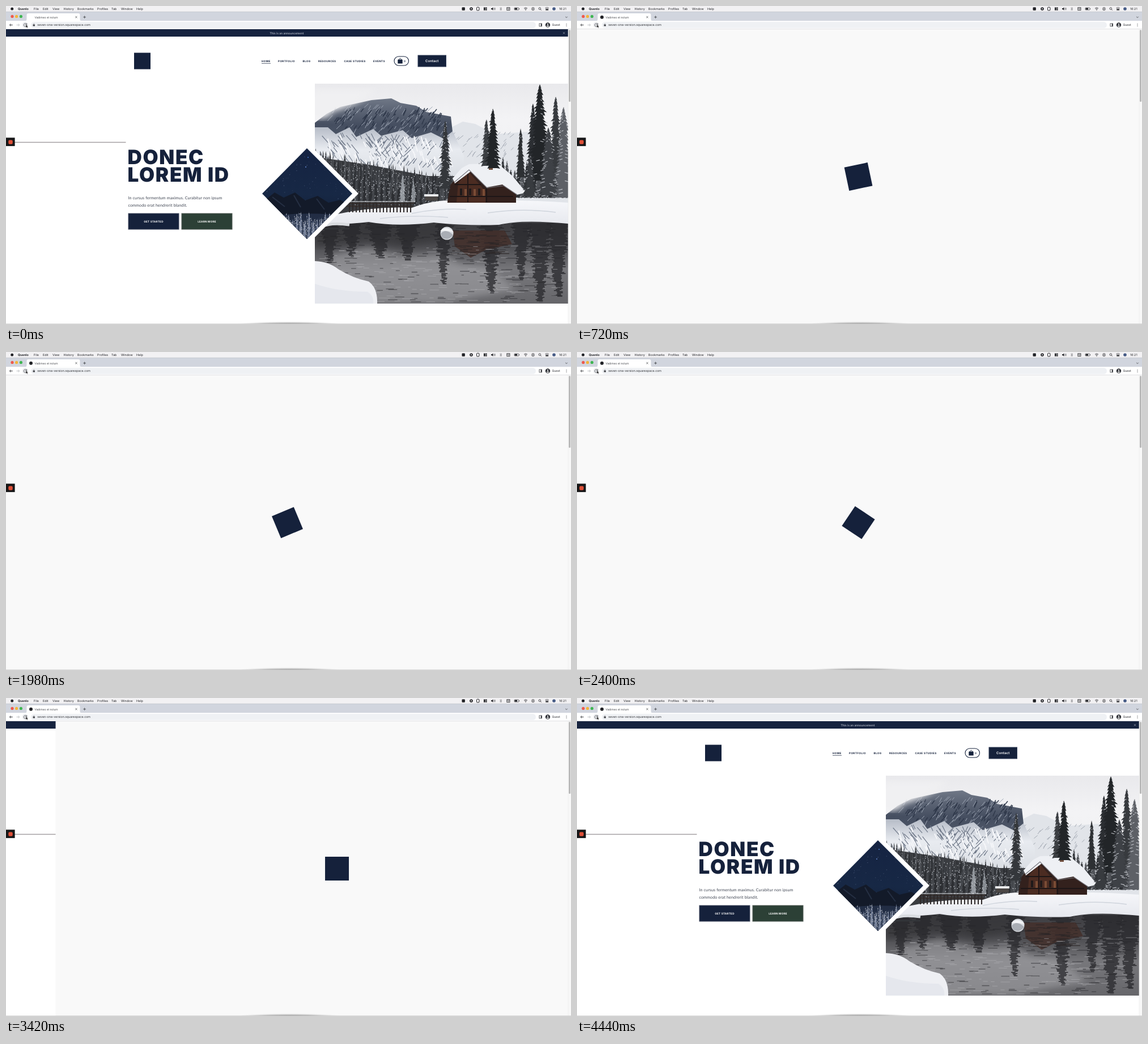
Write an HTML page that moves like this. It is 997 px wide and 561 px high and loops after 4.47 s.

```html
<!DOCTYPE html>
<html lang="en">
<head>
<meta charset="utf-8">
<title>Page loader</title>
<style>
html, body { margin: 0; width: 100%; height: 100%; overflow: hidden; background: #fff; }
svg { display: block; width: 997px; height: 561px; text-rendering: geometricPrecision; }
text { font-family: Inter, "Open Sans", sans-serif; white-space: pre; }
.soft { font-family: Lato, Inter, sans-serif; }
</style>
</head>
<body>
<svg id="stage" viewBox="0 0 997 561" xmlns="http://www.w3.org/2000/svg"></svg>
<script>
const LOOP = 4470, NAVY = '#15213b';

let seed = 11;
const rnd = (a = 0, b = 1) => {
  seed = (seed * 16807) % 2147483647;
  return a + (b - a) * seed / 2147483647;
};
const repeat = (n, fn) => Array.from({ length: n }, (_, i) => fn(i)).join('');
const n1 = v => v.toFixed(1);

const rect = (x, y, w, h, fill, more = '') =>
  `<rect x="${x}" y="${y}" width="${w}" height="${h}" fill="${fill}" ${more}/>`;
const dot = (x, y, r, fill, more = '') => `<circle cx="${x}" cy="${y}" r="${r}" fill="${fill}" ${more}/>`;
const shape = (d, fill, more = '') => `<path d="${d}" fill="${fill}" ${more}/>`;
const line = (d, color, w = 1, more = '') =>
  `<path d="${d}" fill="none" stroke="${color}" stroke-width="${w}" ${more}/>`;
const text = (x, y, size, str, fill, more = '') =>
  `<text x="${x}" y="${y}" font-size="${size}" fill="${fill}" ${more}>${str}</text>`;
const grad = (id, ...stops) => `<linearGradient id="${id}" x1="0" y1="0" x2="0" y2="1">` +
  stops.map(([at, c]) => `<stop offset="${at}" stop-color="${c}"/>`).join('') + '</linearGradient>';

const defs = `<defs>
  ${grad('sky', [0, '#e9e9ec'], [.25, '#f3f3f5'], [1, '#eceef1'])}
  ${grad('rock', [0, '#6f7786'], [.3, '#454e60'], [1, '#6c7482'])}
  ${grad('snow', [0, '#b6bcc7'], [.35, '#e8ebf0'], [1, '#d4d8de'])}
  ${grad('lake', [0, '#3c3c40'], [.3, '#4a4a4e'], [.6, '#77777b'], [1, '#66666a'])}
  ${grad('night', [0, '#152342'], [.5, '#172845'], [1, '#0f1a2f'])}
  ${grad('bank', [0, '#f6f7fa'], [1, '#e6e8ee'])}
  <radialGradient id="dock"><stop offset="0" stop-color="#a5a5a5"/><stop offset=".5" stop-color="#c4c4c4"/>
    <stop offset="1" stop-color="#ddd" stop-opacity="0"/></radialGradient>
  <filter id="blur"><feGaussianBlur stdDeviation="6"/></filter>
  <clipPath id="photo"><rect x="545" y="137" width="447" height="388"/></clipPath>
  <clipPath id="gem"><path d="M531 251L611 331L531 411L452 331Z"/></clipPath>
</defs>`;

// Fir with ragged branches and flecks of snow.
function fir(x, top, base, w, fill, snow = .4) {
  const steps = Math.max(5, Math.round((base - top) / 6)), left = [], right = [];
  let flecks = '';
  for (let i = 1; i <= steps; i++) {
    const y = top + (base - top) * i / steps, half = w * Math.pow(i / steps, .6);
    const l = half * rnd(.6, 1.1), r = half * rnd(.6, 1.1);
    left.unshift(`L${n1(x - l * .55)} ${n1(y)}L${n1(x - l)} ${n1(y + 1)}`);
    right.push(`L${n1(x + r)} ${n1(y + 1)}L${n1(x + r * .55)} ${n1(y)}`);
    for (let k = 0; k < 2; k++) {
      const side = rnd(-.7, .7) * half;
      if (rnd() < snow) flecks += `M${n1(x + side)} ${n1(y - k * 3)}l${n1(Math.sign(side) * half * .3)} 1.6`;
    }
  }
  return shape(`M${x} ${top}${right.join('')}${left.join('')}Z`, fill) + line(flecks, '#c3c6cc', 1.1);
}

function mountains() {
  const streaks = (n, x0, x1, y0, y1, slant, len) => repeat(n, () => {
    const k = rnd(.4, 1);
    return `M${n1(rnd(x0, x1))} ${n1(rnd(y0, y1))}l${n1(k * slant * rnd(.5, 1.3))} ${n1(k * len)}`;
  });
  return rect(545, 137, 447, 250, 'url(#sky)') +
    shape('M770 222L806 204L828 208L862 226L920 222L992 255V350H770Z', '#e1e4e9') +
    line(streaks(45, 790, 905, 222, 262, -8, 8), '#a3a9b3', 1) +
    shape('M545 206L566 190L590 178L622 171L645 166L680 163L696 171L724 176L742 187L785 195L788 222L806 262V320H545Z', 'url(#rock)') +
    line(streaks(90, 585, 770, 178, 214, -8, 11), '#2f384a', 1.5) +
    line(streaks(75, 575, 778, 172, 222, -9, 10), '#9da5b3', 1) +
    shape('M545 214L568 214L582 226L606 214L618 231L648 217L662 229L700 219L716 233L750 223L772 234L788 221L808 264V325H545Z', 'url(#snow)') +
    line(streaks(55, 552, 700, 222, 270, 14, 17), '#717a8a', 1.2) +
    line(streaks(60, 640, 792, 225, 280, -14, 17), '#717a8a', 1.2) +
    line(streaks(70, 560, 790, 228, 280, 9, 20), '#f5f6f9', 2) +
    `<g filter="url(#blur)">${dot(556, 174, 24, '#f0f0f2')}${shape('M545 148H655L618 171L585 184H545Z', '#f0f0f2')}</g>`;
}

function forest() {
  const far = repeat(120, i => {
    const x = 545 + i * 2.5 + rnd(-2, 2), top = 258 + (x - 545) * .19 + rnd(-8, 10);
    return fir(+n1(x), top, top + 50, rnd(3, 5), ['#3a3d42', '#4e5156', '#2c2e32'][i % 3], .35);
  });
  const right = repeat(24, i => fir(835 + i * 7, rnd(262, 290), 338, 8, i % 2 ? '#505358' : '#303337', .6));
  return shape('M545 266L640 280L745 300L800 300V368H545Z', '#3a3c40') + far +
    repeat(45, i => fir(548 + i * 5, rnd(300, 315), 350, 5, i % 2 ? '#2d2f33' : '#45484d', .4)) + right +
    fir(700, 297, 344, 7, '#94999f', .9) + fir(719, 306, 344, 6, '#858a90', .9);
}

function cabin() {
  return shape('M779 345L784 316L803 291L828 285L900 326V347H779Z', '#33211d') +
    shape('M795 346L798 312L816 292L846 327V347Z', '#4b2c22') +
    repeat(6, i => rect(801 + i * 8, 322 + i % 2, 4, 12, i % 2 ? '#7a4c35' : '#1f1a1a')) +
    line('M783 336H895M792 315H838M815 292V346M848 315V346', '#1d1617', 1.8) +
    shape('M788 304L804 286L817 279L868 278L893 299L918 329L902 333L876 315L848 320L820 292L792 313Z', '#eef0f4') +
    line('M791 311L817 289L849 321M848 321L878 317L902 333', '#77777e', 1.2) +
    rect(852, 280, 7, 9, '#72503f');
}

function lake() {
  const ripple = (n, x0, x1, y0, y1) => repeat(n, () =>
    `M${n1(rnd(x0, x1))} ${n1(rnd(y0, y1))}h${n1(rnd(4, 20))}`);
  // A reflection is a stack of short strokes that thins out downwards.
  const column = (x, w, h) => line(repeat(Math.round(h / 2), i => {
    const half = w * (1 - i * 1.6 / h) * rnd(.6, 1.1);
    return `M${n1(x - half + rnd(-3, 3))} ${384 + i * 2}h${n1(half * 2)}`;
  }), '#29292c', 2, 'opacity=".75"');
  return rect(545, 376, 447, 149, 'url(#lake)') +
    shape('M570 440L640 425L700 442L770 436L800 455L850 460L900 500L760 525H600Z', '#a5a5a9', 'opacity=".55" filter="url(#blur)"') +
    shape('M545 380H780L790 410L700 424L640 412L545 425Z', '#343438', 'opacity=".7" filter="url(#blur)"') +
    column(572, 20, 70) + column(610, 20, 60) + column(660, 26, 62) + column(708, 24, 66) +
    column(772, 17, 108) + column(856, 22, 124) + column(910, 18, 100) + column(943, 24, 139) + column(975, 22, 130) +
    shape('M788 396L880 396L893 420L847 430L820 444L792 424Z', '#43302b', 'opacity=".85"') +
    line(ripple(60, 785, 880, 396, 438), '#2b2526', 1.4, 'opacity=".7"') +
    line(ripple(170, 548, 980, 420, 523), '#b7b7bb', 1, 'opacity=".5"') +
    line(ripple(190, 548, 980, 388, 523), '#232326', 1.3, 'opacity=".5"');
}

function shore() {
  const posts = repeat(19, i => `M${606 + i * 6} 347v17`);
  return shape('M580 368Q650 353 716 356Q762 338 812 345Q898 340 992 347V384Q910 376 870 386Q810 388 755 382Q690 390 640 381Q600 386 545 384V368Z', 'url(#bank)') +
    line('M600 348H720M600 353H718', '#37302e', 2.4) + line(posts, '#2e2929', 2) +
    line('M605 345H722', '#e6e8ec', 1.2) +
    line('M716 366Q765 356 812 359M850 365Q910 356 970 364M660 375Q720 368 780 373', '#cfd4dc', 1.4) +
    rect(740, 334, 22, 9, '#4a4644') + rect(738, 332, 25, 4, '#eceef1') +
    line('M555 390Q573 381 606 386', '#d9dce0', 5) + line('M553 393H606', '#33363a', 2) +
    dot(778, 401, 11.5, '#d9dce1') + shape('M767 402Q776 391 789 404Q781 415 770 409Z', '#a9adb4') +
    shape('M766 397Q778 386 790 399Q779 396 766 397Z', '#f3f4f6') +
    shape('M545 450Q570 451 586 464Q612 480 640 486Q656 497 655 525H545Z', '#eeeff3') +
    shape('M545 490Q585 504 638 504Q650 512 648 525H545Z', '#e0e3e9', 'opacity=".6"');
}

function bigFirs() {
  const dark = '#222528';
  return fir(775, 202, 322, 15, '#34373b', .7) + fir(848, 200, 282, 12, '#3b3e42', .5) +
    fir(859, 181, 286, 16, dark, .35) + fir(908, 216, 302, 10, '#2d3033', .3) +
    fir(930, 172, 302, 16, '#2b2e32', .35) + fir(970, 160, 300, 17, '#373a3e', .45) +
    fir(942, 138, 308, 25, dark, .35) + fir(984, 178, 338, 24, '#5d6066', .9) +
    fir(957, 214, 334, 22, '#3e4146', .7) + fir(925, 262, 336, 14, '#383b3f', .6);
}

function nightGem() {
  const stars = repeat(110, () => dot(n1(rnd(455, 608)), n1(rnd(255, 360)), n1(rnd(.2, .6)), '#7f8fb0', 'opacity=".6"'));
  const firs = repeat(45, i => fir(452 + i * 3.6, rnd(362, 378), 411, 4, i % 2 ? '#76829b' : '#38445c', .8));
  return shape('M531 240L622 331L531 422L440 331Z', '#fff') +
    `<g clip-path="url(#gem)">${rect(450, 250, 164, 164, 'url(#night)')}${stars}
    ${dot(533, 267, 1, '#4778cc')}${dot(529, 284, .9, '#6c94df')}
    ${shape('M450 348L474 329L490 338L510 329L528 343L550 335L569 347L590 342L614 356V412H450Z', '#131a29')}
    ${line('M470 337L492 354M508 334L520 355M548 340L562 359', '#252f43', 2)}
    ${shape('M450 373Q530 360 612 372V412H450Z', '#222d44')}${firs}</g>`;
}

function button(x, y, w, h, fill, edge, label, base, size, more) {
  return rect(x, y, w, h, fill, `stroke="${edge}"`) +
    text(x + w / 2, base, size, label, '#fff', `text-anchor="middle" ${more}`);
}

function page() {
  const bold = 'font-weight="700" letter-spacing=".4"';
  const nav = [[451, 'HOME'], [480, 'PORTFOLIO'], [523.5, 'BLOG'], [551, 'RESOURCES'], [596.5, 'CASE STUDIES'], [648, 'EVENTS']];
  const title = 'font-weight="900" letter-spacing="1.7"';
  return rect(0, 41, 992, 520, '#fff') + rect(0, 41, 992, 13, '#16233f') +
    text(495.5, 49.6, 5.3, 'This is an announcement', '#d8dce5', 'class="soft" text-anchor="middle" letter-spacing=".1"') +
    line('M983 46.2l3 3m0-3l-3 3', '#c4c9d3', .6) +
    rect(226, 82.5, 29, 29, NAVY) +
    nav.map(([x, s]) => text(x, 98.6, 4.6, s, NAVY, bold)).join('') +
    line('M451 101.3H467', NAVY, .7) +
    rect(685, 89, 25.5, 16, '#fff', `rx="8" stroke="${NAVY}" stroke-width="1.1"`) +
    rect(691.3, 94.5, 8.4, 7, NAVY, 'rx=".6"') + line('M693.5 96V93.8Q695.5 90.8 697.5 93.8V96', NAVY, 1) +
    text(702, 99, 4.6, '0', NAVY, 'font-weight="600"') +
    button(727, 87, 49.5, 20, NAVY, '#34405a', 'Contact', 99.2, 6, 'font-weight="600" letter-spacing=".1"') +
    line('M0 240.5H211.5', '#a5a0a2', 1.3) +
    text(214.5, 279, 35, 'DONEC', NAVY, title) + text(214.5, 310, 35, 'LOREM ID', NAVY, title) +
    text(215.5, 341.2, 7.1, 'In cursus fermentum maximus. Curabitur non ipsum', '#3d4350', 'class="soft" letter-spacing=".12"') +
    text(215.5, 354.3, 7.1, 'commodo erat hendrerit blandit.', '#3d4350', 'class="soft" letter-spacing=".12"') +
    button(216, 366, 89, 28, NAVY, '#485064', 'GET STARTED', 381.7, 4.7, 'font-weight="700" letter-spacing=".2"') +
    button(310, 366, 89, 28, '#2c4036', '#515a55', 'LEARN MORE', 381.7, 4.7, 'font-weight="700" letter-spacing=".2"') +
    `<g clip-path="url(#photo)">${mountains()}${forest()}${lake()}${shore()}${cabin()}${bigFirs()}</g>` + nightGem();
}

function browser() {
  const ink = '#222327';
  const menu = [[49, 'File'], [65, 'Edit'], [82, 'View'], [101.5, 'History'], [126, 'Bookmarks'],
    [161, 'Profiles'], [186, 'Tab'], [203, 'Window'], [230, 'Help']];
  const bar = rect(0, 0, 997, 10, '#f2f1f3') + dot(10.7, 5, 2.5, ink) +
    text(21, 7, 5.4, 'Quenlo', ink, 'font-weight="700"') +
    menu.map(([x, s]) => text(x, 7, 5.4, s, ink)).join('') +
    rect(804.5, 2.3, 5.4, 5.4, ink, 'rx="1.2"') + dot(821, 5, 2.8, ink) + dot(821, 5, 1.1, '#f2f1f3') +
    rect(830.5, 2.2, 4.5, 5.6, 'none', `rx="1" stroke="${ink}"`) +
    rect(843, 2.4, 2.6, 5.2, ink) + rect(846.2, 2.4, 2.4, 2.3, ink) + rect(846.2, 5.3, 2.4, 2.3, ink) +
    shape('M856 4h1.5l2-1.7v5.4l-2-1.7H856Z', ink) + line('M861 3.5q1 1.5 0 3M862.5 2.7q1.6 2.3 0 4.6', ink, .6) +
    line('M871 3l4 4M873 2.3v5.4l2-1.7M873 2.3l2 1.7-4 3', '#77787c', .6) +
    rect(883.8, 2.7, 5.2, 4.8, 'none', `stroke="${ink}" stroke-width=".8"`) + line('M884 4.2h5M885 5.8h3', ink, .6) +
    rect(897, 3, 8, 4, 'none', `rx="1" stroke="${ink}" stroke-width=".6"`) + rect(897.6, 3.5, 4.5, 3, ink) + rect(905.4, 4.3, .7, 1.5, ink) +
    line('M914 4.2q3-2.7 6 0M915.3 5.6q1.7-1.5 3.4 0', ink, .8) + dot(917, 7, .7, ink) +
    dot(930, 5, 2.6, 'none', `stroke="${ink}" stroke-width=".6"`) + dot(930, 4.3, .9, ink) + line('M928.4 6.7q1.6-1.7 3.2 0', ink, .7) +
    dot(941.8, 4.5, 1.8, 'none', `stroke="${ink}" stroke-width=".8"`) + line('M943.2 5.9l1.7 1.7', ink, .8) +
    rect(952, 2.6, 5.3, 2, 'none', `rx="1" stroke="${ink}" stroke-width=".6"`) + rect(952, 5.5, 5.3, 2, ink, 'rx="1"') +
    dot(967, 5, 2.8, '#465b86') + text(976, 7, 5.4, '16:21', ink);
  const tabs = rect(0, 10, 997, 16.5, '#d1d5de') + line('M0 10.2H997', '#bfc1c8', .6) +
    shape('M33 26.5Q36.5 26.5 36.5 23V16Q36.5 13 39.5 13H127.5Q130.5 13 130.5 16V23Q130.5 26.5 134 26.5Z', '#fff') +
    dot(11, 18.4, 2.6, '#ee594d') + dot(18.6, 18.4, 2.6, '#f3b53a') + dot(26.4, 18.4, 2.6, '#40b654') +
    dot(44, 19.7, 3, ink, 'id="icon"') + text(50.5, 21.6, 4.9, 'Vadimes et nolum', '#44464b') +
    line('M122.3 18l3.2 3.2m0-3.2l-3.2 3.2', '#36383c', .7) +
    line('M136.3 19.6h4.6M138.6 17.3v4.6', '#36383c', .8) + line('M987.2 18.8l1.8 1.8 1.8-1.8', '#36383c', .8);
  const tools = rect(0, 26.3, 997, 14.2, '#fff') + rect(44, 28, 891, 11, '#eff1f4', 'rx="5.5"') +
    line('M0 40.5H997', '#d8dade', .8) +
    line('M11.8 33.5H6.5M8.7 31.2L6.4 33.5L8.7 35.8', '#3f4146', .9) +
    line('M18.5 33.5h5M21.5 31.2l2.3 2.3-2.3 2.3', '#b4b6ba', .8) +
    dot(34, 33.4, 5, '#e6e7ea') + line('M36.2 32.2A2.6 2.6 0 1 0 36.3 34.7M36.5 30.6V32.6H34.5', '#505257', .8) +
    shape('M35.2 32.6V38l1.2-1 .9 2 .9-.4-.9-1.9h1.6Z', '#111', 'stroke="#fff" stroke-width=".3"') +
    rect(47.6, 32.8, 3.4, 2.8, '#45474c', 'rx=".4"') + line('M48.3 33V32q1-1.7 2 0v1', '#45474c', .6) +
    text(55.3, 35.2, 5.3, 'seven-one-version.squarespace.com', '#2c2e33') +
    rect(941, 31, 4.6, 4.8, 'none', 'stroke="#3c3e43" stroke-width=".8"') + rect(943.8, 31, 1.8, 4.8, '#3c3e43') +
    dot(956, 33.4, 4.2, '#303238') + dot(956, 32.1, 1.2, '#fff') + shape('M953.5 35.8Q956 32.9 958.5 35.8Q956 37.3 953.5 35.8Z', '#fff') +
    text(963.4, 35.4, 5.2, 'Guest', '#2c2e33') + repeat(3, i => dot(989, 31.5 + i * 2, .6, '#3c3e43'));
  const overlay = rect(992, 41, 5, 520, '#f8f8f8') + line('M992 41V561', '#e7e7e7', .6) +
    rect(993.1, 42, 3, 127, '#b7b7b7', 'rx="1.5"') +
    rect(0, 232.3, 15.6, 14.8, '#171718') + rect(4.3, 236.4, 7.4, 7.4, '#df5038', 'rx="2"') +
    '<ellipse cx="500" cy="561" rx="92" ry="4.5" fill="url(#dock)"/>' + line('M0 560.7H997', '#b8b8b8', .6);
  return bar + tabs + tools + overlay;
}

const loader = `<g id="loader">${rect(0, 41, 992, 520, '#f9f9f9')}
  <g transform="translate(496.5 301)"><rect id="mark" x="-21" y="-21" width="42" height="42" fill="${NAVY}"/></g></g>`;

const stage = document.getElementById('stage');
stage.innerHTML = defs + page() + loader + browser();
const panel = document.getElementById('loader');
const mark = document.getElementById('mark');
const icon = document.getElementById('icon');

const clamp = v => Math.min(1, Math.max(0, v));
const cubic = p => p < .5 ? 4 * p ** 3 : 1 - 4 * (1 - p) ** 3;
// Distance covered by a speed that ramps from 0 to 1 between a and b.
const ramp = (t, a, b) => t < a ? 0 : t < b ? (t - a) ** 2 / (2 * (b - a)) : t - (a + b) / 2;

function draw(t) {
  const loading = t >= 30;
  icon.style.display = panel.style.display = loading ? '' : 'none';
  const turn = 360 / 2680 * (ramp(t, 30, 250) - ramp(t, 2750, 2890));
  mark.setAttribute('transform', `rotate(${turn.toFixed(2)})`);
  const slide = 997 * cubic(clamp((t - 3260) / 575));
  panel.setAttribute('transform', `translate(${slide.toFixed(2)} 0)`);
}

function tick() {
  draw(performance.now() % LOOP);
  requestAnimationFrame(tick);
}
tick();
</script>
</body>
</html>
```
